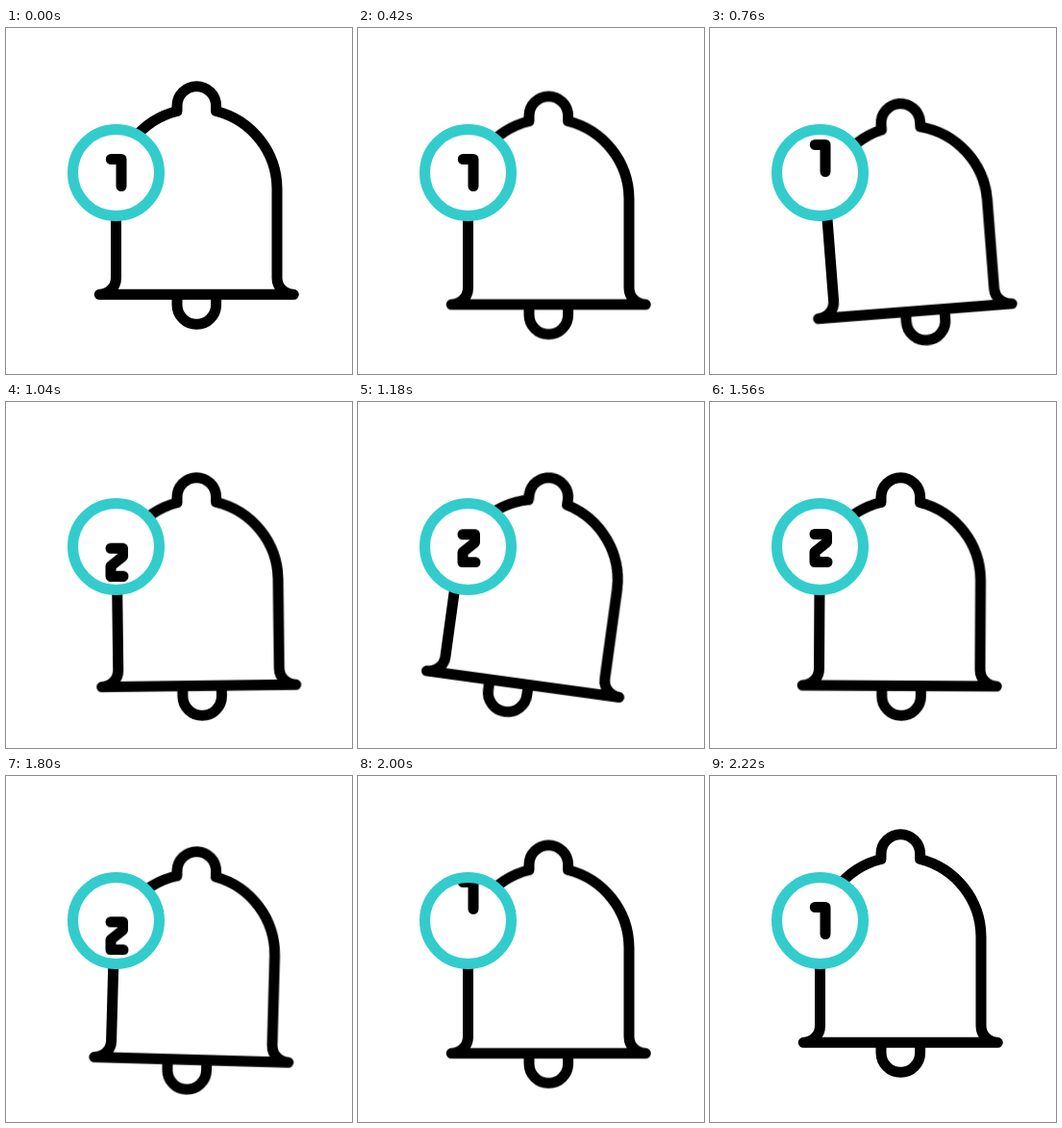
Recreate the animation shown at these times as an HTML page. Size 360x360 px, loop 2400 ms.

```html
<!DOCTYPE html>
<html lang="en">
<head>
<meta charset="utf-8">
<title>Notification bell</title>
<style>
  html, body {
    margin: 0;
    width: 100%;
    height: 100%;
    overflow: hidden;
    background: #fff;
  }
  svg { display: block; width: 100%; height: 100%; }
  .ink {
    fill: none;
    stroke: #000;
    stroke-width: 11;
    stroke-linecap: round;
    stroke-linejoin: round;
  }
  .drop, .swing, .clapper, .digits {
    animation: 2400ms cubic-bezier(.3333, 0, .6667, 1) infinite;
  }
  .drop { animation-name: drop; }
  .swing { animation-name: swing; transform-origin: 198px 81px; }
  .clapper { animation-name: clapper; }
  .digits { animation-name: digits; }

  @keyframes drop {
    0%, 8.333% { transform: translateY(0); }
    25%, 77.5% { transform: translateY(18px); }
    91.667%, 100% { transform: translateY(0); }
  }
  /* decaying swing, bottom goes right first */
  @keyframes swing {
    0%, 25% { transform: rotate(0deg); }
    37.5% { transform: rotate(-8deg); }
    50% { transform: rotate(8deg); }
    60% { transform: rotate(-4deg); }
    69.58% { transform: rotate(4deg); }
    79.17%, 100% { transform: rotate(0deg); }
  }
  @keyframes clapper {
    0%, 25% { transform: translateX(0); }
    37.5% { transform: translateX(18.5px); }
    50% { transform: translateX(-15px); }
    60% { transform: translateX(17px); }
    69.58% { transform: translateX(-11px); }
    79.17%, 100% { transform: translateX(0); }
  }
  /* scrolls from 1 to 2 and back */
  @keyframes digits {
    0%, 25% { transform: translateY(0); }
    50%, 69.17% { transform: translateY(-85px); }
    91.667%, 100% { transform: translateY(0); }
  }
</style>
</head>
<body>
<svg viewBox="0 0 360 360">
  <clipPath id="face"><circle cx="114.5" cy="150.5" r="45"/></clipPath>

  <g class="drop">
    <g class="swing ink">
      <path class="clapper" d="M178 282V288A20.3 20.3 0 0 0 218.6 288V282"/>
      <path d="M178 86.5V81A20.3 20.3 0 0 1 218.6 81V86.5A84 84 0 0 1 282 167V260A17.3 17.3 0 0 0 299.3 277.3H97.2A17.3 17.3 0 0 0 114.5 260V167A84 84 0 0 1 178 86.5"/>
    </g>
  </g>

  <circle cx="114.5" cy="150.5" r="45" fill="#fff"/>
  <g clip-path="url(#face)">
    <g class="digits ink">
      <path d="M109.3 136.5H120V164.5"/>
      <path d="M109 222.5H121.5V231L109 241V251.5H122"/>
    </g>
  </g>
  <circle cx="114.5" cy="150.5" r="45" fill="none" stroke="#33cccc" stroke-width="11"/>
</svg>
</body>
</html>
```
